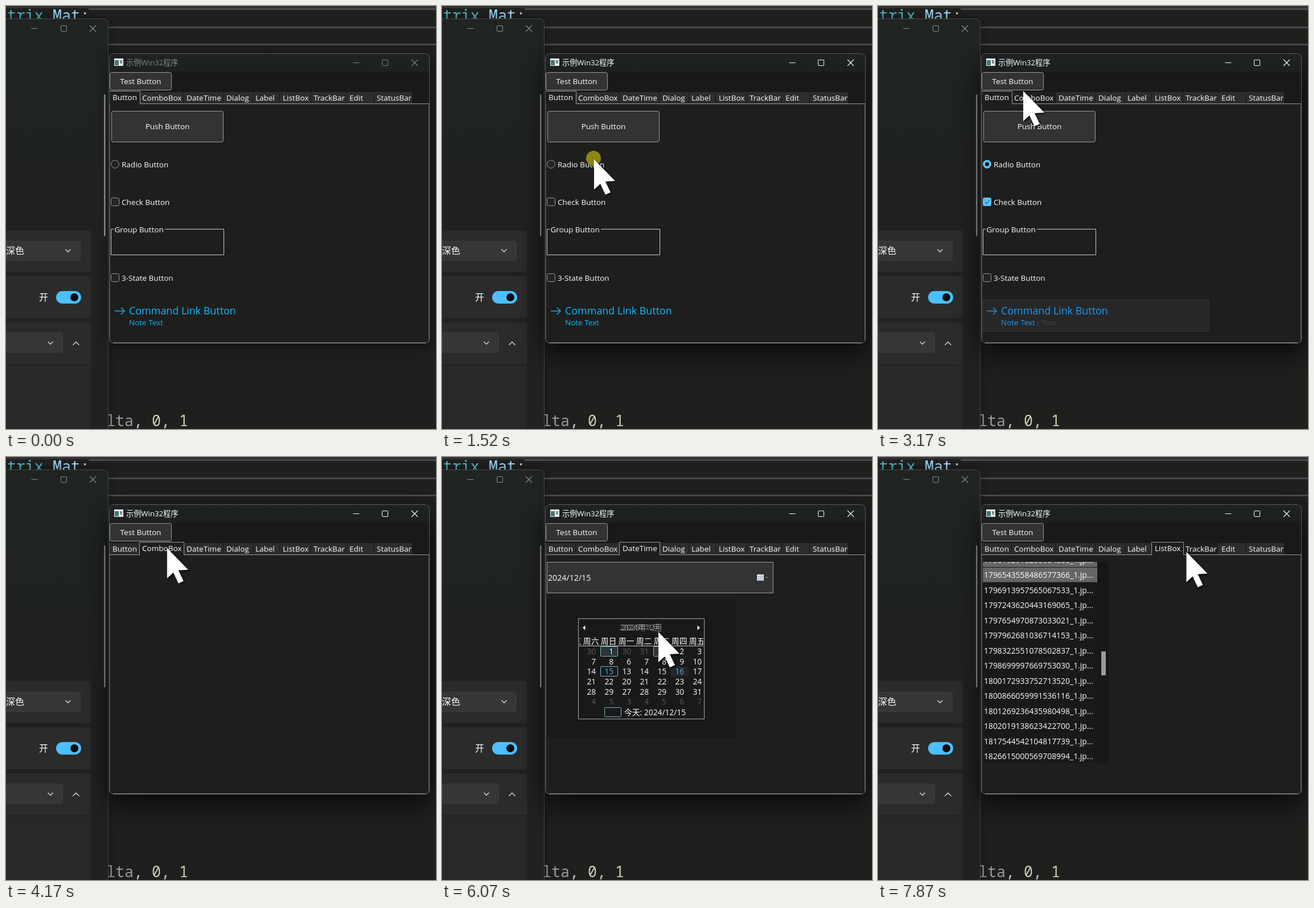
Animation, 755 px wide and 742 px high, one loop 8000 ms. Source, as an HTML page with a canvas:

```html
<!DOCTYPE html>
<html lang="zh-CN">
<head>
<meta charset="utf-8">
<style>
html, body { margin: 0; width: 100%; height: 100%; overflow: hidden; background: #1f1f1e; }
canvas { display: block; }
</style>
</head>
<body>
<canvas id="stage" width="755" height="742"></canvas>
<script>
const ctx = document.getElementById('stage').getContext('2d');
const LOOP = 8000, STEP = 126.4;
const UI = '"Open Sans", "Noto Sans CJK SC", "Noto Sans CJK", sans-serif';
const MONO = '"Noto Sans Mono", monospace';
const LINE = '#9b9b9b', PAGE = '#1e1e1d', DARK = '#191919', FACE = '#333333';

const TABS = [['Button', 182, 187], ['ComboBox', 235, 239], ['DateTime', 312, 317],
  ['Dialog', 382, 387], ['Label', 434, 438], ['ListBox', 481, 486],
  ['TrackBar', 536, 540], ['Edit', 597, 603], ['StatusBar', 646, 651]];
const TAB_END = 714;
const TAB_CHANGES = [[0, 0], [3900, 1], [4540, 2], [6430, 3], [7330, 4], [7700, 5]];

// time, x, y of the pointer tip
const PATH = [[120, 570, 541], [500, 430, 360], [880, 290, 214], [1120, 285, 214],
  [1400, 267, 269], [1780, 267, 269], [1900, 258, 276], [2150, 257, 338], [2400, 257, 338],
  [2650, 256, 512], [2800, 262, 549], [2900, 262, 545], [3160, 255, 149], [3300, 255, 126],
  [3550, 258, 126], [3790, 275, 160], [4000, 275, 160], [4400, 345, 158], [4920, 345, 157],
  [5056, 370, 297], [5300, 380, 307], [6150, 380, 307], [6380, 412, 158], [6820, 412, 158],
  [7070, 469, 165], [7360, 469, 165], [7580, 512, 166], [7700, 514, 166], [7830, 541.5, 166.5]];
const CLICKS = [1010, 1500, 2240, 3880, 4420, 6410, 7200, 7580];
const CLICK_TIME = 140;

// month slides: start time, from, to (months relative to December 2024)
const SLIDES = [[5300, 0, -1], [5600, -1, 0], [5894, 0, 1]];
const SLIDE_TIME = 250;

const FILES = ['1796192910266964800', '1796543558486577366', '1796913957565067533',
  '1797243620443169065', '1797654970873033021', '1797962681036714153',
  '1798322551078502837', '1798699997669753030', '1800172933752713520',
  '1800866059991536116', '1801269236435980498', '1802019138623422700',
  '1817544542104817739', '1826615000569708994'];

const clamp = v => Math.max(0, Math.min(1, v));
const ramp = (t, a, b) => clamp((t - a) / (b - a));

function rect(x, y, w, h, fill, stroke, r = 0) {
  ctx.beginPath();
  const o = stroke ? 0.5 : 0;
  ctx.roundRect(x + o, y + o, w - 2 * o, h - 2 * o, r);
  if (fill) { ctx.fillStyle = fill; ctx.fill(); }
  if (stroke) { ctx.strokeStyle = stroke; ctx.lineWidth = 1; ctx.stroke(); }
}

function text(s, x, cy, size = 13.5, color = '#fff', align = 'left', font = UI) {
  ctx.font = `${size}px ${font}`;
  ctx.textAlign = align;
  ctx.fillStyle = color;
  ctx.fillText(s, x, cy + size * 0.36);
}

function line(points, color, width = 1) {
  ctx.beginPath();
  points.forEach(([x, y]) => ctx.lineTo(x, y));
  ctx.strokeStyle = color;
  ctx.lineWidth = width;
  ctx.stroke();
}

function shape(points, color) {
  ctx.beginPath();
  points.forEach(([x, y]) => ctx.lineTo(x, y));
  ctx.closePath();
  ctx.fillStyle = color;
  ctx.fill();
}

function disc(x, y, r, fill, stroke) {
  ctx.beginPath();
  ctx.arc(x, y, r, 0, 7);
  if (fill) { ctx.fillStyle = fill; ctx.fill(); }
  if (stroke) { ctx.strokeStyle = stroke; ctx.lineWidth = 1; ctx.stroke(); }
}

function clipped(x, y, w, h, paint) {
  ctx.save();
  ctx.beginPath();
  ctx.rect(x, y, w, h);
  ctx.clip();
  paint();
  ctx.restore();
}

function verticalFade(y0, y1, from, to) {
  const g = ctx.createLinearGradient(0, y0, 0, y1);
  g.addColorStop(0, from);
  g.addColorStop(1, to);
  return g;
}

const chevron = (x, y, d, s = 4.5) =>
  line([[x - s, y - d * s / 2], [x, y + d * s / 2], [x + s, y - d * s / 2]], '#ddd', 1.3);

function captionButtons(xs, y, color) {
  const [min, max, close] = xs;
  line([[min - 5.5, y + .5], [min + 5.5, y + .5]], color);
  rect(max - 5, y - 5, 11, 11, null, color, 1.5);
  line([[close - 5, y - 5], [close + 6, y + 6]], color, 1.1);
  line([[close + 6, y - 5], [close - 5, y + 6]], color, 1.1);
}

function button(label, x, y, w, h, fill = FACE) {
  rect(x, y, w, h, fill, LINE, 3);
  text(label, x + w / 2, y + h / 2, 13.5, '#fff', 'center');
}

function drawEditor() {
  rect(0, 0, 755, 742, '#1f1f1e');
  rect(0, 0, 755, 4, '#333333');
  rect(145, 4, 610, 3, '#494949');
  rect(179, 36, 576, 3, '#494949');
  rect(179, 66, 576, 3, '#494949');
  text('Matrix', -30, 16.5, 26.6, '#4fb8c4', 'left', MONO);
  text('Mat', 82, 16.5, 26.6, '#9cdcfe', 'left', MONO);
  text(';', 130, 16.5, 26.6, '#d0d0d0', 'left', MONO);
  text('lta', 176, 727, 26.6, '#9a9a9a', 'left', MONO);
  text(',', 224, 727, 26.6, '#c8c8c8', 'left', MONO);
  text('0', 256, 727, 26.6, '#c5d3b0', 'left', MONO);
  text(',', 272, 727, 26.6, '#c8c8c8', 'left', MONO);
  text('1', 304, 727, 26.6, '#c5d3b0', 'left', MONO);
}

function drawSettings() {
  ctx.save();
  ctx.shadowColor = 'rgba(0,0,0,.4)';
  ctx.shadowBlur = 16;
  rect(-20, 22, 200, 760, verticalFade(22, 400, '#1f2423', '#202121'), null, 8);
  ctx.restore();
  rect(-20, 22, 200, 760, null, '#484b4a', 8);
  captionButtons([50, 101, 152], 39, '#8d8f8e');
  rect(172, 155, 2.5, 249, '#979797', null, 1);
  for (const y of [393, 474, 555]) rect(-10, y, 159, 73.5, '#2b2b2b', null, 4);
  rect(-10, 630, 159, 130, '#282828');
  rect(-10, 412, 141, 35, '#363636', '#3e3e3e', 4);
  rect(-10, 573, 110, 35, '#363636', '#3e3e3e', 4);
  text('深色', 0, 429, 16);
  chevron(109, 429, 1);
  text('开', 58, 511.5, 16);
  rect(88, 500, 44, 22, '#4cbfff', null, 11);
  disc(120, 511, 7, '#0b0b0b');
  chevron(78, 591, 1);
  chevron(123, 592, -1, 5.5);
}

function drawTabs(active, hot) {
  rect(182, 115, 561, 57, DARK);
  button('Test Button', 182, 116, 109, 32);
  TABS.forEach(([name, x, tx], i) => {
    const end = i + 1 < TABS.length ? TABS[i + 1][1] : TAB_END;
    if (i === active) return;
    rect(x, 151, end - x - 1, 20, i === hot ? '#1f1f1f' : '#2d2d2d');
    text(name, tx, 161);
  });
  rect(182, 171, 561, 1, LINE);
  const [name, x, tx] = TABS[active], end = TABS[active + 1][1];
  rect(x - 1, 149, end - x + 2, 24, PAGE);
  line([[x - .5, 172], [x - .5, 149.5], [end + .5, 149.5], [end + .5, 172]], LINE);
  text(name, tx, 160);
}

function drawWindow(focused, tab, hot) {
  ctx.save();
  ctx.shadowColor = focused ? 'rgba(0,0,0,.75)' : 'rgba(0,0,0,.45)';
  ctx.shadowBlur = focused ? 48 : 24;
  ctx.shadowOffsetY = focused ? 18 : 6;
  rect(181, 83, 563, 509, PAGE, null, 8);
  ctx.restore();
  const paint = focused ? '#fff' : '#858686';
  rect(181, 83, 563, 32, verticalFade(83, 115, '#1c2223', '#1e2020'), null, [8, 8, 0, 0]);
  rect(190, 92, 16, 13, '#eee');
  rect(191, 95, 7, 9, '#3c7774');
  rect(200, 95, 4, 6, '#7d8c94');
  text('示例Win32程序', 211, 99, 13.2, paint);
  captionButtons([615, 665, 717], 99, paint);
  drawTabs(tab, hot);
  rect(742, 172, 1, 417, '#686868');
  rect(182, 172, 1, 417, '#4a4a4a');
  rect(181, 83, 563, 509, null, '#5b5d5d', 8);
  rect(188, 590, 549, 1.5, '#7b7b7b');
}

function drawButtonTab(t) {
  const hover = ramp(t, 640, 760) * (1 - ramp(t, 1180, 1300));
  const pressed = t >= 1010 && t < 1130;
  const face = pressed ? 45 : Math.round(51 + 9 * hover);
  button('Push Button', 185, 184, 197, 55, `rgb(${face},${face},${face})`);

  if (t > 1620) {
    disc(191.5, 277.5, 7.5, '#5cc0f5');
    disc(191.5, 277.5, 3.4, '#101010');
  } else disc(191.5, 277.5, 7, '#242424', LINE);
  text('Radio Button', 203, 278);

  if (t > 2340) {
    rect(184, 336, 15, 15, '#5cc0f5', null, 3);
    line([[188, 344], [190.5, 346.5], [195.5, 341]], '#123', 1);
  } else rect(184, 336, 15, 15, '#242424', LINE, 3);
  text('Check Button', 203, 344);

  rect(184, 391, 199, 46, null, '#cfcfcf');
  rect(189, 389, 90, 5, PAGE);
  text('Group Button', 190.5, 392);
  rect(184, 469, 15, 15, '#242424', LINE, 3);
  text('3-State Button', 203, 477);

  const link = ramp(t, 2740, 2880) * (1 - ramp(t, 3170, 3420));
  ctx.globalAlpha = link;
  rect(184, 515, 398, 56, '#272727', '#363636');
  if (t > 3000) clipped(279, 545, 60, 22, () => text('Note Text', 253, 555, 13.5, '#404447'));
  ctx.globalAlpha = 1;
  const blue = `rgb(${15 + 12 * link},${186 - 30 * link},${252 - 4 * link})`;
  line([[191, 535], [208, 535]], blue, 1.4);
  line([[202, 529], [208, 535], [202, 541]], blue, 1.4);
  text('Command Link Button', 216, 534.5, 17.9, blue);
  text('Note Text', 216, 555, 13.5, blue);
}

function drawMonth(offset, selected, shift) {
  const first = new Date(2024, 11 + offset, 1);
  const lead = (first.getDay() + 6) % 7;
  for (let i = 0; i < 42; i++) {
    const col = i % 7, row = Math.floor(i / 7);
    const x = 257 + 31 * col + shift, y = 341 + 17.7 * row;
    if (!row) text('周' + '一二三四五六日'[col], x, 323, 13.8, '#fff', 'center');
    const date = new Date(2024, 11 + offset, 1 - lead + i);
    const inside = date.getMonth() === first.getMonth(), day = date.getDate();
    const picked = inside && day === selected;
    const today = inside && offset === 0 && day === 15;
    const hot = inside && offset === 1 && day === 16;
    if (picked || today) rect(Math.round(x - 15), Math.round(y - 9), 31, 18, picked ? '#2a3338' : null, '#78bcc8', 1);
    if (hot) rect(x - 15, y - 9, 31, 18, '#232628');
    const color = !inside ? '#5c5c5c' : hot || (today && !picked) ? '#45b5ee' : '#fff';
    text(day, x + 8.5, y, 13.8, color, 'right');
  }
}

function drawDateTab(t) {
  rect(184, 184, 398, 55, FACE, LINE);
  text('2024/12/15', 186, 211.5, 14.2);
  rect(553, 206, 12, 11, '#e4eaf0');
  for (let i = 1; i < 4; i++) {
    rect(553 + 3 * i, 207, 1, 10, '#a9b6c3');
    rect(553, 206 + 3 * i, 11, 1, '#a9b6c3');
  }
  shape([[567, 210], [573, 210], [570, 213]], '#6d6d6d');

  rect(185, 250, 330, 243, DARK);
  rect(239, 283, 222, 177, DARK, '#a9a9a9');
  shape([[247, 299.5], [251.5, 295.5], [251.5, 303.5]], '#fff');
  shape([[453, 299.5], [448.5, 295.5], [448.5, 303.5]], '#fff');

  const slide = SLIDES.filter(s => s[0] <= t).pop();
  const [start, from, to] = slide || [0, 0, 0];
  const p = clamp((t - start) / SLIDE_TIME), dir = Math.sign(to - from);
  const title = (m, alpha) => {
    const d = new Date(2024, 11 + m, 1);
    ctx.globalAlpha = alpha;
    text(`${d.getFullYear()}年${d.getMonth() + 1}月`, 349.5, 299.5, 13.8, '#fff', 'center');
    ctx.globalAlpha = 1;
  };
  if (p < 1) title(from, 1 - p * p);
  title(to, p * p);
  const pick = start === SLIDES[0][0] || !slide ? 15 : 1;
  clipped(241, 310, 218, 129, () => {
    if (p < 1) drawMonth(from, pick, -217 * dir * p);
    drawMonth(to, slide ? 1 : 15, 217 * dir * (1 - p));
    rect(p < 1 ? 241 : 245, 331, p < 1 ? 218 : 210, 1, '#c8c8c8');
  });
  rect(285, 439, 30, 17, null, '#78bcc8', 1);
  text('今天: 2024/12/15', 320, 448, 13.8);
}

function drawDialogTab() {
  ['Test InputBox', 'Test TaskDialog', 'Test MsgBox']
    .forEach((label, i) => button(label, 185, 174 + 55 * i, 197, 54));
}

function drawListTab() {
  rect(184, 184, 221, 353, DARK);
  rect(385, 184, 20, 353, '#171717');
  clipped(184, 184, 201, 353, () => FILES.forEach((id, i) => {
    const y = 180.5 + 26.5 * i;
    if (i < 2) rect(184, y - 13, 201, 25.5, '#666');
    text(id + '_1.jp...', 186, y, 13.9);
  }));
  rect(392, 341, 8, 42, '#9a9a9a');
}

function pointerAt(t) {
  const next = PATH.findIndex(k => k[0] > t);
  if (next < 0) return PATH[PATH.length - 1].slice(1);
  if (next === 0) return null;
  const [t0, x0, y0] = PATH[next - 1], [t1, x1, y1] = PATH[next];
  const p = (t - t0) / (t1 - t0);
  return [x0 + (x1 - x0) * p, y0 + (y1 - y0) * p];
}

function drawPointer([x, y], t) {
  if (CLICKS.some(c => t >= c && t < c + CLICK_TIME)) disc(x - 1, y - 2, 13, '#8a8612');
  ctx.save();
  ctx.shadowColor = 'rgba(0,0,0,.85)';
  ctx.shadowBlur = 3;
  ctx.shadowOffsetX = ctx.shadowOffsetY = 2;
  shape([[0, 0], [0, 53], [11, 43], [20, 62], [29, 58], [20, 39], [37, 38]]
    .map(([dx, dy]) => [x + dx, y + dy]), '#fff');
  ctx.restore();
}

function render(t) {
  const tab = TAB_CHANGES.filter(c => c[0] <= t).pop()[1];
  const tip = pointerAt(t);
  const hot = tip && tip[1] >= 149 && tip[1] < 172 ? TABS.findLastIndex(b => b[1] <= tip[0]) : -1;
  drawEditor();
  drawSettings();
  drawWindow(t > 1010, tab, hot);
  if (tab === 0) drawButtonTab(t);
  if (tab === 2) drawDateTab(t);
  if (tab === 3) drawDialogTab();
  if (tab === 5) drawListTab();
  if (tip) drawPointer(tip, t);
}

function tick(now) {
  render(Math.floor((now % LOOP) / STEP) * STEP);
  requestAnimationFrame(tick);
}
requestAnimationFrame(tick);
</script>
</body>
</html>
```
